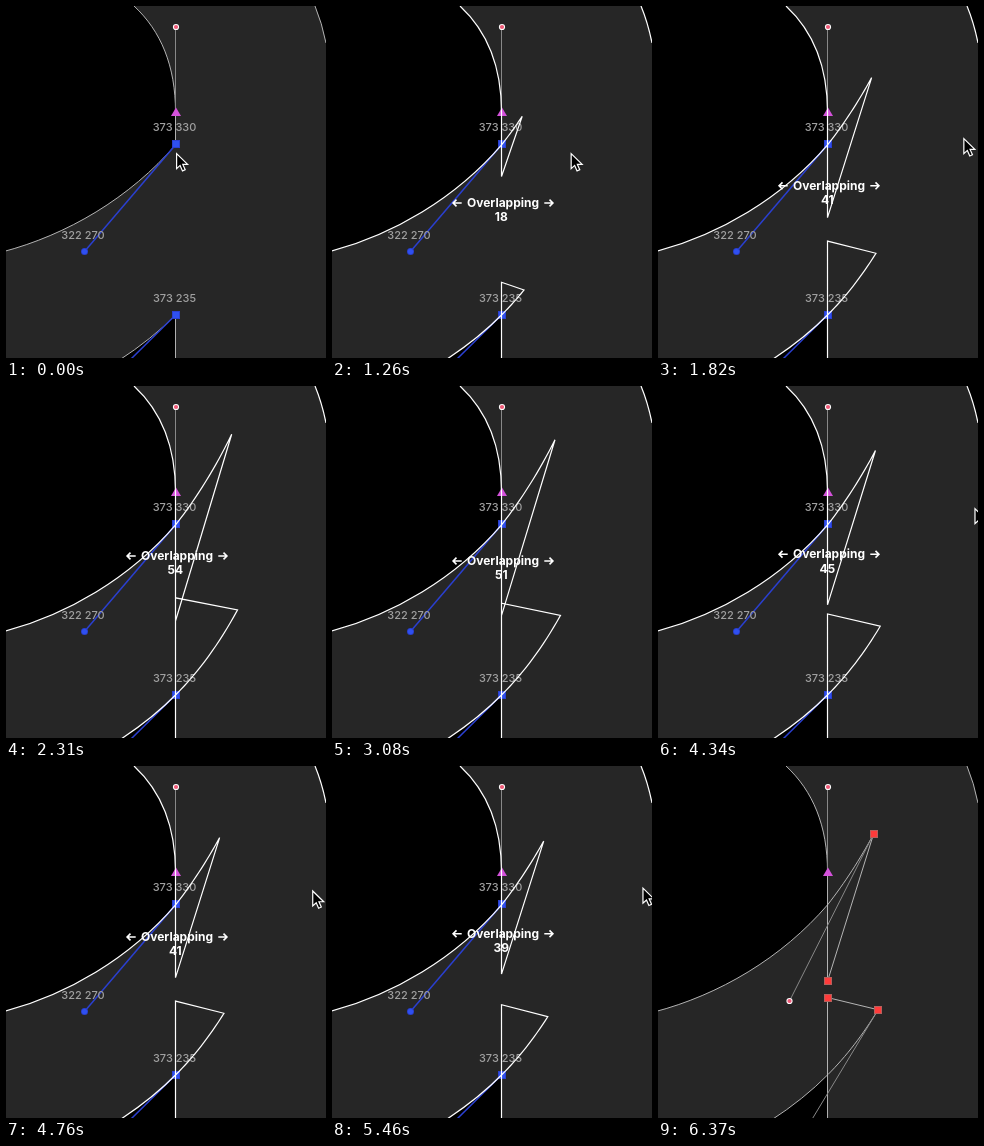
An HTML page with a canvas for the animation above (6440 ms loop, 320 px wide and 352 px high).

```html
<!DOCTYPE html>
<html lang="en">
<head>
<meta charset="utf-8">
<title>Overlapping nodes</title>
<style>
  html, body { margin: 0; width: 320px; height: 352px; overflow: hidden; background: #262626; }
  canvas { display: block; }
</style>
</head>
<body>
<canvas id="stage" width="320" height="352"></canvas>
<script>
const ctx = document.getElementById('stage').getContext('2d');
const LOOP = 6440, STEP = 70;
const DRAG_START = 350, DRAG_END = 6300, RESULT = 6370;
const X = 169.5, NODE_A = 138.3, NODE_B = 308.5, UNIT = 1.79;
const BLUE = '#2f50f0', DARK_BLUE = '#2a3fd0';
const FONT = 'Inter, "Liberation Sans", sans-serif';

// time, overlap, readout height
const keys = [
  [280, 0, 197], [1260, 18, 197], [1610, 35, 184], [2310, 54, 170],
  [2730, 60, 172], [3080, 51, 175], [3920, 48, 165.5], [4760, 41, 171],
  [4970, 35, 171], [5880, 43, 165], [6020, 43, 164]
];

const clamp = v => Math.min(1, Math.max(0, v));

function poseAt(t) {
  const i = Math.max(1, keys.findIndex(k => k[0] >= t));
  const end = t > keys[keys.length - 1][0];
  const b = end ? keys[keys.length - 1] : keys[i];
  const a = end ? b : keys[i - 1];
  const k = end ? 0 : clamp((t - a[0]) / (b[0] - a[0]));
  const [, amount, y] = a.map((v, j) => v + (b[j] - v) * k);
  const drift = 14 * clamp((t - 5000) / 700);
  return {
    n: Math.round(amount),
    y,
    cursorX: 186 + 2.93 * amount - 16 * Math.exp(-amount / 4) + drift,
    cursorY: 0.87 * y - 24.4
  };
}

// Outline ends, extended past the nodes by n units
const upperTip = n => [170 + 1.17 * n - 0.00257 * n * n, NODE_A - 1.5 * n - 0.0031 * n * n];
const lowerTip = n => [170 + 1.264 * n - 0.0023 * n * n, NODE_B - 1.26 * n - 0.0057 * n * n];

function extend(p, tip, n) {
  for (let i = 1; i <= 16; i++) p.lineTo(...tip(n * i / 16));
}

function bowl(p) {
  p.moveTo(128, 0);
  p.bezierCurveTo(155, 25, X, 60, X, 106);
}

function upperSweep(p) {
  p.moveTo(-4, 246);
  p.bezierCurveTo(61, 229, 124, 192, 170, NODE_A);
}

function lowerSweep(p) {
  p.moveTo(112, 355);
  p.quadraticCurveTo(146, 333, 170, NODE_B);
}

function corner(p) {
  p.moveTo(309, 0);
  p.quadraticCurveTo(316, 17, 320, 37);
}

function outline(n) {
  const p = new Path2D();
  bowl(p);
  p.lineTo(X, NODE_A + UNIT * n);
  if (n) p.lineTo(...upperTip(n));
  upperSweep(p);
  extend(p, upperTip, n);
  lowerSweep(p);
  extend(p, lowerTip, n);
  p.lineTo(X, NODE_B - UNIT * n);
  p.lineTo(X, 353);
  corner(p);
  return p;
}

function stroke(path, color, width) {
  ctx.strokeStyle = color;
  ctx.lineWidth = width;
  ctx.stroke(path);
}

function line(x1, y1, x2, y2, color, width = 1) {
  const p = new Path2D();
  p.moveTo(x1, y1);
  p.lineTo(x2, y2);
  stroke(p, color, width);
}

function dot(x, y, r, color) {
  ctx.fillStyle = color;
  ctx.beginPath();
  ctx.arc(x, y, r, 0, 7);
  ctx.fill();
}

function box(x, y, size, color) {
  ctx.fillStyle = color;
  ctx.fillRect(x - size / 2, y - size / 2, size, size);
}

function square(x, y, color, rim) {
  box(x, y, 8, rim);
  box(x, y, 6, color);
}

function ring(x, y) {
  dot(x, y, 3.1, '#fff');
  dot(x, y, 2.1, '#ee5a78');
}

function text(s, x, y, font, color) {
  ctx.font = font + ' ' + FONT;
  ctx.fillStyle = color;
  ctx.textAlign = 'center';
  ctx.fillText(s, x, y);
}

const label = (s, x, y) => text(s, x, y, '500 11px', '#a0a0a0');
const bold = (s, x, y) => text(s, x, y, 'bold 12px', '#fff');

function drawFills() {
  ctx.fillStyle = '#262626';
  ctx.fillRect(0, 0, 320, 352);
  ctx.fillStyle = '#000';
  const p = new Path2D();
  bowl(p);
  p.lineTo(170, NODE_A);
  p.bezierCurveTo(124, 192, 61, 229, -4, 246);
  p.lineTo(-4, 0);
  lowerSweep(p);
  p.lineTo(170, 355);
  corner(p);
  p.lineTo(320, 0);
  ctx.fill(p);
}

function drawTopHandle() {
  line(X, 21, X, 104, '#888');
  ring(170, 21);
  ctx.fillStyle = '#d552dc';
  ctx.beginPath();
  ctx.moveTo(170, 101.5);
  ctx.lineTo(175, 110);
  ctx.lineTo(165, 110);
  ctx.fill();
}

function drawNodes() {
  line(170, NODE_A, 78.5, 245.5, DARK_BLUE, 1.5);
  line(170, NODE_B, 124, 354, DARK_BLUE, 1.5);
  square(170, 138, BLUE, DARK_BLUE);
  square(170, 309, BLUE, DARK_BLUE);
  dot(78.5, 245.5, 3.5, DARK_BLUE);
  dot(78.5, 245.5, 2.6, BLUE);
  label('373 330', 168.5, 125);
  label('322 270', 77, 233);
  label('373 235', 168.5, 296);
}

function drawResult(n) {
  const a = upperTip(n), b = lowerTip(n);
  line(...a, 131.5, 235, '#888');
  line(...b, 153, 355, '#888');
  for (const [x, y] of [a, b, [170, NODE_A + UNIT * n], [170, NODE_B - UNIT * n]]) {
    square(Math.round(x), Math.round(y), '#ff3b3b', '#b5605c');
  }
  ring(131.5, 235);
}

function arrow(x, y, dir) {
  const p = new Path2D();
  p.moveTo(x - 4.2 * dir, y);
  p.lineTo(x + 4.2 * dir, y);
  p.moveTo(x + dir, y - 3.4);
  p.lineTo(x + 4.4 * dir, y);
  p.lineTo(x + dir, y + 3.4);
  stroke(p, '#fff', 1.6);
}

function drawReadout(y, n) {
  arrow(125.5, y, -1);
  arrow(216.5, y, 1);
  bold('Overlapping', 171, y + 4);
  bold(n, 169.3, y + 18.3);
}

function drawCursor(x, y) {
  const p = new Path2D('M0 0V15L3.5 11.8L5.9 17.3L8.6 16.1L6.2 10.8H11Z');
  ctx.save();
  ctx.translate(x + 0.6, y + 0.6);
  ctx.fillStyle = '#000';
  ctx.fill(p);
  stroke(p, '#fff', 1.2);
  ctx.restore();
}

function draw(t) {
  const { n, y, cursorX, cursorY } = poseAt(t);
  const done = t >= RESULT;
  const dragging = t >= DRAG_START && !done;
  drawFills();
  if (!dragging) stroke(outline(n), '#c4c4c4', 0.9);
  drawTopHandle();
  if (done) {
    drawResult(n);
    return;
  }
  drawNodes();
  if (dragging) stroke(outline(n), '#fff', 1.2);
  if (dragging && t < DRAG_END) drawReadout(y, n);
  drawCursor(cursorX, cursorY);
}

function frame(now) {
  draw(Math.floor((now % LOOP) / STEP) * STEP);
  requestAnimationFrame(frame);
}
ctx.miterLimit = 3;
requestAnimationFrame(frame);
</script>
</body>
</html>
```
